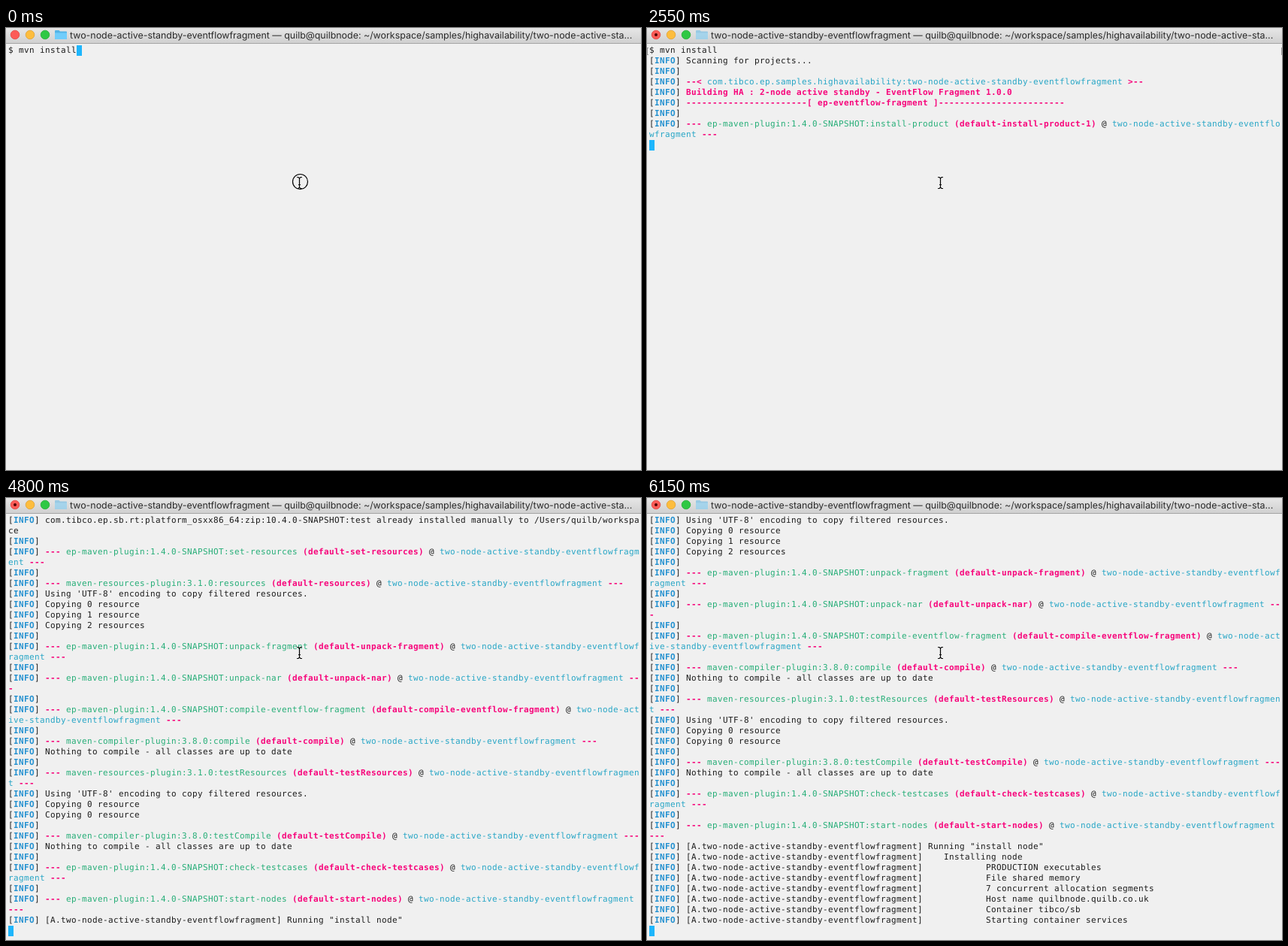
Animation of 845 by 588 pixels, one loop 8 s. Source, as an HTML page:

```html
<!DOCTYPE html>
<html lang="en">
<head>
<meta charset="utf-8">
<title>Terminal</title>
<style>
  html, body { margin: 0; width: 100%; height: 100%; overflow: hidden; background: #f0f0f0; }
  #stage { position: relative; width: 845px; height: 588px; overflow: hidden; }
  svg { position: absolute; left: 0; top: 0; }
  svg text { font: 12.42px Inter, sans-serif; fill: #2a2a2a; text-rendering: geometricPrecision; }
  #screen { position: absolute; top: 23px; width: 845px; height: 560px; overflow: hidden; }
  #log {
    position: absolute; width: 845px; color: #1c1c1c;
    font: 11px/14px "DejaVu Sans Mono", monospace;
    letter-spacing: calc(7px - 1ch); text-rendering: geometricPrecision;
  }
  #log > div { height: 14px; padding-left: 3px; white-space: pre; }
  #log b { color: #2491d0; }
  #log b.p { color: #f7057b; }
  .g { color: #27ae78; }
  .c { color: #28a6c6; }
  #cursor { position: absolute; width: 7px; height: 14px; background: #1eb6fc; }
  #log i { position: absolute; top: 3px; height: 8px; border: 1px solid #999; }
  #log i.l { left: 0; width: 1px; border-right: 0; }
  #log i.r { right: 0; width: 0; border-left: 0; }
</style>
</head>
<body>
<div id="stage">
  <svg width="845" height="588">
    <defs>
      <linearGradient id="bar" x2="0" y2="1">
        <stop stop-color="#e6e6e6"/><stop offset="1" stop-color="#d0d0d0"/>
      </linearGradient>
    </defs>
    <rect width="845" height="20" fill="url(#bar)"/>
    <rect y="20" width="845" height="1" fill="#a5a5a5"/>
    <g stroke-width=".8">
      <circle cx="12" cy="9" r="5.8" fill="#fc5b57" stroke="#e2453f"/>
      <circle cx="32" cy="9" r="5.8" fill="#fdbd3e" stroke="#e0a133"/>
      <circle cx="52" cy="9" r="5.8" fill="#2fc844" stroke="#24ab35"/>
    </g>
    <circle id="dot" cx="12" cy="9" r="2" fill="#4d0000"/>
    <g id="folder">
      <path d="M65 4q0-1 1-1h4.500l1.500 1.500h8q1 0 1 1v8.500q0 1-1 1h-14q-1 0-1-1z" fill="#54b4e6"/>
      <path d="M65 6.500h16v7.500q0 1-1 1h-14q-1 0-1-1z" fill="#70cdfb"/>
    </g>
    <text x="85" y="14">two-node-active-standby-eventflowfragment — quilb@quilbnode: ~/workspace/samples/highavailability/two-node-active-sta...</text>
  </svg>
  <div id="screen"><div id="log"></div><div id="cursor"></div></div>
  <svg width="845" height="588" fill="none" stroke="#000">
    <circle id="ring" cx="391.500" cy="204.500" r="10" stroke-width="1.200"/>
    <path stroke-width="1.200"
      d="M387 198.500h2l1.500 1.500l1.500-1.500h2M390.500 200v12M387 213.500h2l1.500-1.500l1.500 1.500h2M389 208.500h3"/>
  </svg>
</div>
<script>
const COLS = 120, VISIBLE = 39, ROW = 14, LOOP = 8000;
const PROJECT = 'two-node-active-standby-eventflowfragment';
const EP = 'ep-maven-plugin:1.4.0-SNAPSHOT:';
const RES = 'maven-resources-plugin:3.1.0:';
const COMP = 'maven-compiler-plugin:3.8.0:';

// A line is a list of [style, text] pieces; '' is plain text.
const info = (...parts) => [['', '['], ['b', 'INFO'], ['', '] '], ...parts];
const say = text => info(['', text]);
const node = text => say(`[A.${PROJECT}] ${text}`);
const detail = text => node(' '.repeat(11) + text);
const goal = (plugin, name, id = name) => [info(), info(
  ['p', '--- '], ['g', plugin + name], ['p', ` (default-${id})`],
  ['', ' @ '], ['c', PROJECT], ['p', ' ---'])];
const copying = (...counts) => [
  say("Using 'UTF-8' encoding to copy filtered resources."),
  ...counts.map(n => say(`Copying ${n} resource${n > 1 ? 's' : ''}`))];
const upToDate = say('Nothing to compile - all classes are up to date');

const lines = [
  [['', '$ mvn install']],
  say('Scanning for projects...'),
  info(),
  info(['p', '--< '], ['c', 'com.tibco.ep.samples.highavailability:' + PROJECT], ['p', ' >--']),
  info(['p', 'Building HA : 2-node active standby - EventFlow Fragment 1.0.0']),
  info(['p', '-'.repeat(23) + '[ ep-eventflow-fragment ]' + '-'.repeat(24)]),
  ...goal(EP, 'install-product', 'install-product-1'),
  say('com.tibco.ep.sb.rt:platform_osxx86_64:zip:10.4.0-SNAPSHOT:test already installed manually to /Users/quilb/workspace'),
  ...goal(EP, 'set-resources'),
  ...goal(RES, 'resources'),
  ...copying(0, 1, 2),
  ...goal(EP, 'unpack-fragment'),
  ...goal(EP, 'unpack-nar'),
  ...goal(EP, 'compile-eventflow-fragment'),
  ...goal(COMP, 'compile'),
  upToDate,
  ...goal(RES, 'testResources'),
  ...copying(0, 0),
  ...goal(COMP, 'testCompile'),
  upToDate,
  ...goal(EP, 'check-testcases'),
  ...goal(EP, 'start-nodes'),
  node('Running "install node"'),
  node('   Installing node'),
  detail('PRODUCTION executables'),
  detail('File shared memory'),
  detail('7 concurrent allocation segments'),
  detail('Host name quilbnode.quilb.co.uk'),
  detail('Container tibco/sb'),
  detail('Starting container services'),
];

// [time, rows printed so far]
const steps = [[0, 1], [1200, 2], [2100, 6], [2550, 9], [4200, 16], [4350, 31],
  [4650, 47], [4800, 48], [4950, 49], [5850, 54], [6150, 55]];

const $ = id => document.getElementById(id);
const log = $('log'), cursor = $('cursor');
const rows = [];

function addRow() {
  const row = log.appendChild(document.createElement('div'));
  rows.push(row);
  return row;
}

function addLine(parts) {
  let row = addRow(), col = 0;
  for (let [style, text] of parts) {
    while (text) {
      if (col === COLS) { row = addRow(); col = 0; }
      const piece = text.slice(0, COLS - col);
      const span = document.createElement(style === 'b' || style === 'p' ? 'b' : 'span');
      span.className = style;
      span.textContent = piece;
      row.append(span);
      col += piece.length;
      text = text.slice(piece.length);
    }
  }
}

lines.forEach(addLine);
const marks = ['l', 'r'].map(side => {
  const mark = log.appendChild(document.createElement('i'));
  mark.className = side;
  return mark;
});

function draw(t) {
  const count = steps.filter(([at]) => at <= t).pop()[1];
  const scroll = Math.max(0, count - VISIBLE);
  const entered = t >= 150;
  const fade = t < 150 ? 0 : t < 300 ? 0.5 : 1;

  rows.forEach((row, i) => row.style.visibility = i < count ? 'visible' : 'hidden');
  log.style.top = -scroll * ROW + 'px';
  cursor.style.left = (entered ? 3 : 94) + 'px';
  cursor.style.top = (entered ? (count - scroll) * ROW : 0) + 'px';
  marks.forEach(mark => mark.style.display = entered ? 'block' : 'none');
  $('ring').style.display = entered ? 'none' : '';
  $('dot').style.opacity = fade;
  $('folder').style.opacity = 1 - 0.5 * fade;
}

const start = performance.now();
function tick() {
  draw((performance.now() - start) % LOOP);
  requestAnimationFrame(tick);
}
tick();
</script>
</body>
</html>
```
